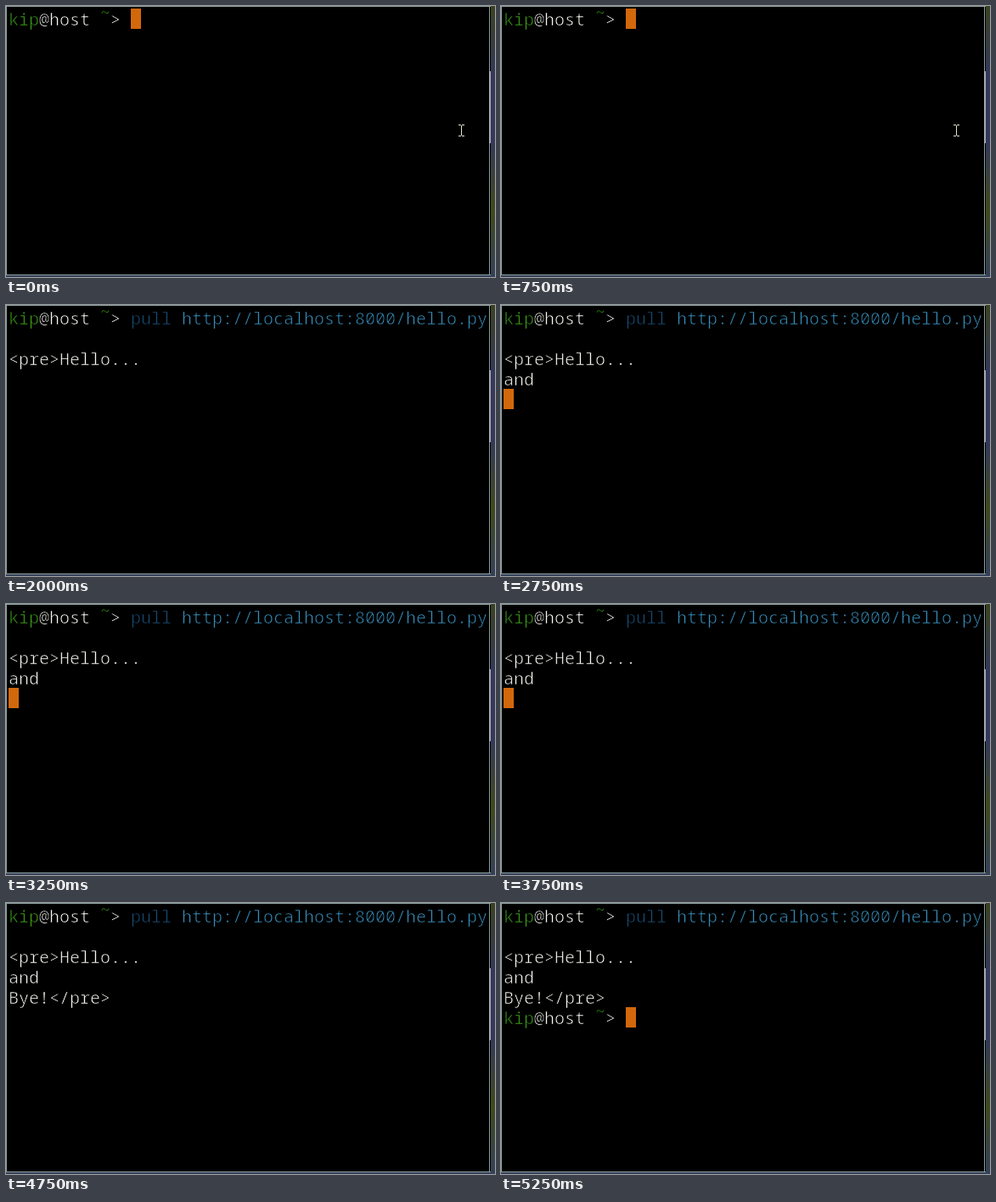
An HTML page with a canvas for the animation above (5500 ms loop, 576 by 320 pixels).

```html
<!DOCTYPE html>
<html lang="en">
<head>
<meta charset="utf-8">
<title>Terminal</title>
<style>
  html, body { margin: 0; width: 100%; height: 100%; overflow: hidden; background: #000; }
  canvas { display: block; width: 576px; height: 320px; }
</style>
</head>
<body>
<canvas id="stage" width="576" height="320"></canvas>
<script>
const ctx = document.getElementById('stage').getContext('2d');
const LOOP = 5500, STEP = 250;
const COL = 12, ROW = 24, LEFT = 3, TOP = 3, BASE = 20;
const TYPED = 'pu', REST = 'll', URL_TEXT = 'http://localhost:8000/hello.py';
const C = {
  back: '#000', white: '#f8f8f2', green: '#3a9c16', red: '#b5150e', hint: '#5a5a5a',
  cmd: '#184a70', link: '#368cb8', cursor: '#d2680c', under: '#462400'
};
// Moments at which the screen changes
const T = { type: 1000, hint: 1250, run: 1500, hello: 1750, and: 2750, bye: 4750, prompt: 5000 };

const desk = ctx.createLinearGradient(0, 0, 0, 320);
['#3b4220', '#35385a', '#35385a', '#404a1c', '#35405a'].forEach((c, i) => desk.addColorStop(i / 4, c));

function rect(x, y, w, h, color) {
  ctx.fillStyle = color;
  ctx.fillRect(x, y, w, h);
}

// Places each character in its cell; the outline in the back colour thins the strokes
function put(text, col, row, color, lift = 0, back = C.back) {
  ctx.fillStyle = color;
  ctx.strokeStyle = back;
  ctx.lineWidth = 0.6;
  [...text].forEach((ch, i) => {
    const x = LEFT + (col + i + 0.5) * COL, y = TOP + row * ROW + BASE - lift;
    ctx.fillText(ch, x, y);
    ctx.strokeText(ch, x, y);
  });
}

function cursor(col, row) {
  rect(LEFT + col * COL, TOP + row * ROW, COL, ROW, C.cursor);
}

function prompt(row) {
  put('kip', 0, row, C.green);
  put('@host', 3, row, C.white);
  put('~', 9, row, C.green, 8);
  put('>', 10, row, C.white);
}

function frame() {
  rect(0, 0, 576, 320, desk);
  rect(0, 0, 571, 318, '#8aa0a0');
  rect(1, 1, 568, 316, C.back);
  rect(570, 1, 1, 316, C.back);
  rect(569, 77, 2, 85, '#a3aab0');
}

function pointer(x, y) {
  const c = '#e4e4d0';
  rect(x, y + 1, 1, 12, c);
  for (const dy of [0, 13]) {
    rect(x - 3, y + dy, 3, 1, c);
    rect(x + 1, y + dy, 3, 1, c);
  }
}

function commandLine(t) {
  if (t < T.type) return cursor(12, 0);
  if (t >= T.run) {
    put(TYPED + REST, 12, 0, C.cmd);
    put(URL_TEXT, 17, 0, C.link);
    return;
  }
  put(TYPED, 12, 0, C.red);
  cursor(14, 0);
  if (t >= T.hint) {
    put(REST[0], 14, 0, C.under, 0, C.cursor);
    put(REST[1] + ' ' + URL_TEXT.slice(0, -2) + '…', 15, 0, C.hint);
  }
}

function output(t) {
  if (t >= T.hello) put('<pre>Hello...', 0, 2, C.white);
  if (t >= T.and) put('and', 0, 3, C.white);
  if (t >= T.and && t < T.bye) cursor(0, 4);
  if (t >= T.bye) put('Bye!</pre>', 0, 4, C.white);
  if (t >= T.prompt) {
    prompt(5);
    cursor(12, 5);
  }
}

function draw(now) {
  const t = Math.floor((now % LOOP) / STEP) * STEP;
  ctx.font = '20px "Noto Sans Mono", "Liberation Mono", monospace';
  ctx.textAlign = 'center';
  ctx.textBaseline = 'alphabetic';
  ctx.lineJoin = 'round';
  frame();
  prompt(0);
  commandLine(t);
  output(t);
  if (t < T.type) pointer(536, 140);
}

function tick() {
  draw(performance.now());
  requestAnimationFrame(tick);
}
tick();
</script>
</body>
</html>
```
